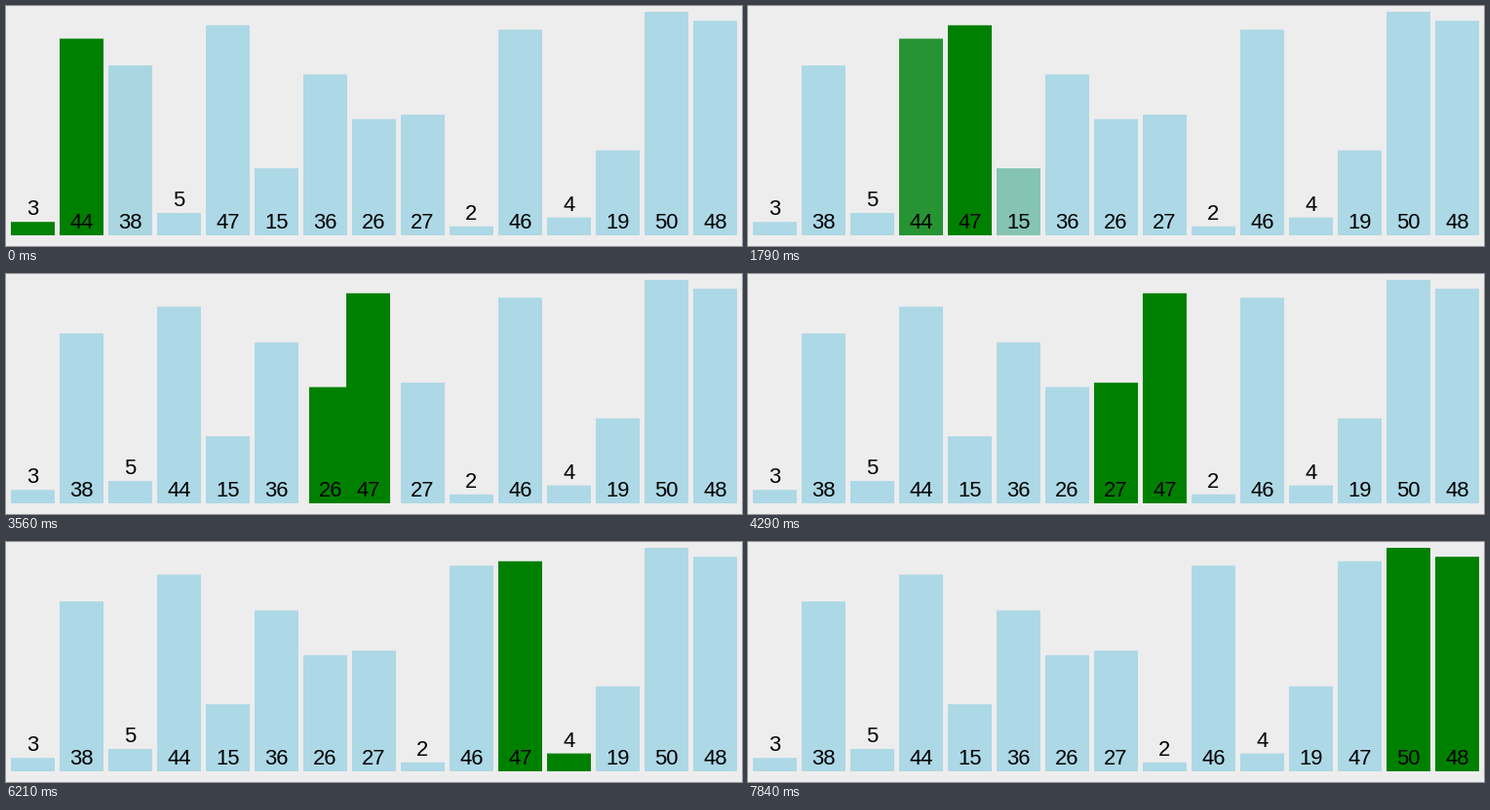
These frames come from a looping animation (755 by 247 pixels, 7990 ms). A matplotlib script:

```python
import numpy as np
import matplotlib.pyplot as plt
from matplotlib.animation import FuncAnimation
from matplotlib.patches import Rectangle

W, H, DPI = 755, 247, 100
LOOP, FRAMES = 7990, 54           # loop length in ms
STEP, MOVE = 340.7, 235           # step period and tween length in ms
FIRST_START, START = -40, -18     # the opening step runs slightly early

VALUES = [3, 44, 38, 5, 47, 15, 36, 26, 27, 2, 46, 4, 19, 50, 48]
N = len(VALUES)
PITCH, BAR_W, MARGIN = 50, 45, 5
BASE, UNIT = 236, 4.6
LABEL_GAP, FONT_PX = 7, 22
BACK = "#ededed"
IDLE = np.array([173, 216, 230]) / 255
ACTIVE = np.array([0, 128, 0]) / 255


def bubble_states():
    """Slot and highlight of every bar after each step of one bubble pass."""
    order = list(range(N))
    states = []

    def record(i):
        slots, glow = np.zeros(N), np.zeros(N)
        slots[order] = np.arange(N)
        glow[order[i:i + 2]] = 1
        states.append((slots, glow))

    for i in range(N - 1):
        record(i)
        if VALUES[order[i]] > VALUES[order[i + 1]]:
            order[i], order[i + 1] = order[i + 1], order[i]
            record(i)
    return states


def ease(u):
    """Cubic in-out, clamped to 0..1."""
    u = min(max(u, 0), 1)
    return 4 * u ** 3 if u < 0.5 else 1 - 4 * (1 - u) ** 3


STATES = bubble_states()

fig = plt.figure(figsize=(W / DPI, H / DPI), dpi=DPI, facecolor=BACK)
ax = fig.add_axes([0, 0, 1, 1])
ax.set_xlim(0, W)
ax.set_ylim(H, 0)
ax.axis("off")

bars, labels = [], []
for n, value in enumerate(VALUES):
    height = value * UNIT
    bar = Rectangle((0, BASE - height), BAR_W, height, lw=0, snap=False, zorder=n + 1)
    ax.add_patch(bar)
    bars.append(bar)
    foot = BASE - height if value < 10 else BASE   # short bars carry the label on top
    labels.append(ax.text(0, foot - LABEL_GAP, str(value), family="Liberation Sans",
                          size=FONT_PX * 72 / DPI, color="black", ha="center",
                          va="baseline", zorder=n + 1.5))


def draw(frame):
    t = frame * LOOP / FRAMES
    k = min(int((t - START) // STEP), len(STATES) - 2)
    begin = START + k * STEP if k else FIRST_START
    p = ease((t - begin) / MOVE)
    (slot_a, glow_a), (slot_b, glow_b) = STATES[k], STATES[k + 1]
    xs = MARGIN + PITCH * (slot_a + (slot_b - slot_a) * p)
    glow = glow_a + (glow_b - glow_a) * p
    for bar, label, x, g in zip(bars, labels, xs, glow):
        bar.set_x(x)
        bar.set_facecolor(IDLE + (ACTIVE - IDLE) * g)
        label.set_x(x + BAR_W / 2)
    return bars + labels


anim = FuncAnimation(fig, draw, frames=FRAMES, interval=LOOP / FRAMES,
                     repeat=True, repeat_delay=0, blit=False)
plt.show()
```
